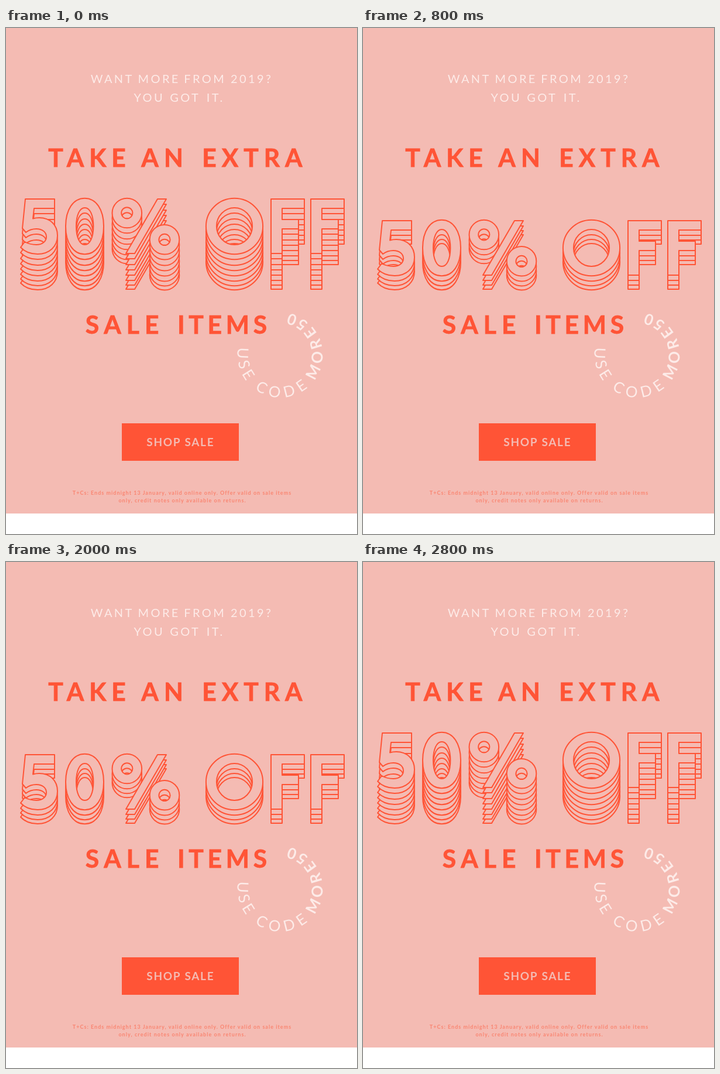
An HTML page that plays this animation: 600 by 864 pixels, repeating every 3200 ms.

```html
<!DOCTYPE html>
<html lang="en">
<head>
<meta charset="utf-8">
<title>Sale</title>
<style>
  html, body { margin: 0; width: 100%; height: 100%; overflow: hidden; background: #fff; }
  svg { display: block; width: 100%; height: 100%; }
  text { font-family: Lato, "Open Sans", sans-serif; text-anchor: middle; }
  .pale { fill: #fdebe8; }
  .coral { fill: #ff5436; }
  .pink { fill: #f4bbb3; }
  .small { fill: #fa8571; }
  .bold { font-weight: 700; }
  .heavy { font-weight: 700; stroke: #ff5436; stroke-width: 0.8; }
  #letters { stroke: #ff5436; stroke-width: 2; stroke-linejoin: round; fill-rule: evenodd; }
</style>
</head>
<body>
<svg id="stage" viewBox="0 0 600 864">
  <defs><path id="letters" class="pink"/></defs>
  <rect class="pink" width="600" height="829"/>
  <g id="stack"></g>
  <rect class="coral" x="198" y="675" width="200" height="64"/>
</svg>
<script>
const stage = document.getElementById('stage');
const stack = document.getElementById('stack');

function add(parent, tag, attributes, content = '') {
  const node = document.createElementNS('http://www.w3.org/2000/svg', tag);
  for (const name in attributes) node.setAttribute(name, attributes[name]);
  node.textContent = content;
  parent.append(node);
  return node;
}

// Static text: each entry is a piece of text and its visual centre.
function line(className, size, spacing, baseline, pieces) {
  for (const [text, center] of pieces)
    add(stage, 'text', {
      class: className, x: center + spacing / 2, y: baseline,
      'font-size': size, 'letter-spacing': spacing
    }, text);
}

line('pale', 20, 3.4, 94, [['WANT', 180], ['MORE', 260], ['FROM', 338.5], ['2019?', 418.5]]);
line('pale', 20, 3.4, 125.5, [['YOU', 243], ['GOT', 304.5], ['IT.', 356.5]]);
line('coral heavy', 42.5, 9, 236.5, [['TAKE', 138.5], ['AN', 267], ['EXTRA', 421]]);
line('coral heavy', 42.5, 9, 522.3, [['SALE', 198.5]]);
line('coral heavy', 42.5, 6.8, 522.3, [['ITEMS', 369.5]]);
line('pink bold', 19, 1.7, 714, [['SHOP', 269], ['SALE', 330]]);
line('small bold', 9, 1.02, 797,
  [['T+Cs: Ends midnight 13 January, valid online only. Offer valid on sale items', 300.5]]);
line('small bold', 9, 1.06, 810, [['only, credit notes only available on returns.', 301]]);

// Round text: angles run counterclockwise from the bottom of the ring.
function arc(className, text, angles) {
  angles.forEach((angle, i) => add(stage, 'text', {
    class: className, y: 73, 'font-size': 26,
    transform: `translate(468.5 558) rotate(${-angle})`
  }, text[i]));
}
arc('pale', 'USECODE', [-92.5, -75, -58, -29.5, -8.5, 14, 34.5]);
arc('pale bold', 'MORE50', [62.5, 86, 106.5, 126, 144, 161.5]);

// Outlined letters, drawn at the topmost position.
// A fullness above 0.552 makes the oval squarer than an ellipse.
function oval(cx, cy, rx, ry = rx, fullness = 0.552) {
  const kx = rx * fullness, ky = ry * fullness;
  return `M${cx - rx} ${cy}c0 ${-ky} ${rx - kx} ${-ry} ${rx} ${-ry}` +
    `s${rx} ${ry - ky} ${rx} ${ry}s${kx - rx} ${ry} ${-rx} ${ry}s${-rx} ${ky - ry} ${-rx} ${-ry}z`;
}
const letterF = x => `M${x} 292h57v16h-38v19h28v16h-28v42h-19z`;

document.getElementById('letters').setAttribute('d', [
  'M33 292H83V308H48L46 325.5C49 324.5 53 324 57 324C75 324 88 336 88 354.5',
  'C88 373 74 386 54 386C42 386 32 382 25 374.5L32 365',
  'C38 368.5 45 370 52 370C62 370 69 364.5 69 356.5C69 348.5 62 343 52 343',
  'C45 343 39 345 34 349L28 342Z',
  oval(134.5, 338.5, 32.5, 47.7, 0.6), oval(134.7, 338.5, 14.7, 31.5, 0.6),
  oval(206.8, 316, 25.3), oval(206.8, 315.8, 9.6),
  'M259 292H274L220 385H205Z',
  oval(271, 361.2, 25.3), oval(271, 361.4, 9.6),
  oval(390.5, 338.5, 48.6, 47.7), oval(390.5, 338.5, 30.6, 31.5),
  letterF(453), letterF(521)
].join(''));

// Lower layers come first so that higher ones cover them.
const offsets = [0, 9, 19, 28, 37, 46, 54, 61];
const layers = offsets.map(y => add(stack, 'use', { href: '#letters', y }));
layers.forEach(layer => stack.prepend(layer));

const LOOP = 3200, STEP = 200;
function draw(now) {
  const step = Math.floor(now % LOOP / STEP);
  const top = Math.max(0, 7 - Math.abs(7 - step));
  layers.forEach((layer, i) => { layer.style.display = i < top ? 'none' : ''; });
}

const start = performance.now();
function tick() {
  draw(performance.now() - start);
  requestAnimationFrame(tick);
}
tick();
</script>
</body>
</html>
```
